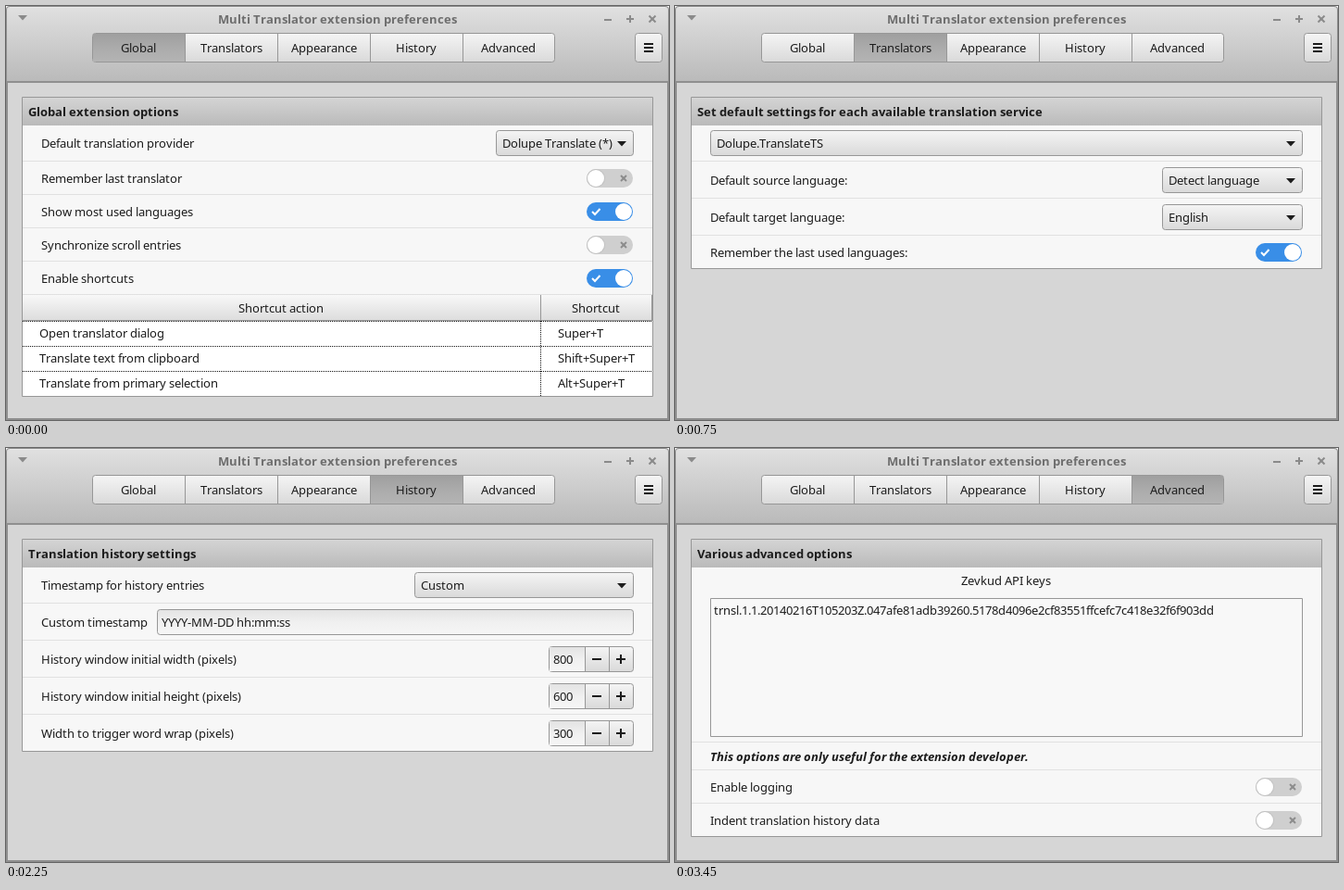
An HTML page with a canvas that plays this animation: 716x447 px, repeating every 3750 ms.

```html
<!DOCTYPE html>
<html lang="en">
<head>
<meta charset="utf-8">
<title>Extension preferences</title>
<style>
html, body { margin: 0; width: 100%; height: 100%; overflow: hidden; background: #d6d6d6; }
canvas { display: block; }
</style>
</head>
<body>
<canvas id="stage" width="716" height="447"></canvas>
<script>
const ctx = document.getElementById('stage').getContext('2d');
const PAGE_MS = 750;
const FAMILY = '"Noto Sans", sans-serif';
const INK = '#1c1c1c', EDGE = '#979797', BLUE = '#398ee7';
const advances = new Map();

function fill(color, x, y, w, h) {
  ctx.fillStyle = color;
  ctx.fillRect(x, y, w, h);
}

function shade(y, h, ...colors) {
  const g = ctx.createLinearGradient(0, y, 0, y + h);
  colors.forEach((c, i) => g.addColorStop(i / (colors.length - 1), c));
  return g;
}

// Glyphs advance by whole pixels, as in a hinted desktop toolkit.
function advance(ch, style) {
  const key = style + ch;
  if (!advances.has(key)) advances.set(key, Math.round(ctx.measureText(ch).width));
  return advances.get(key);
}

function text(str, x, middle, color = INK, style = '') {
  ctx.font = `${style} 13px ${FAMILY}`;
  ctx.fillStyle = color;
  for (const ch of str) {
    ctx.fillText(ch, x, middle + 5);
    x += advance(ch, style);
  }
}

function box(x, y, w, h, paint, edge = EDGE, radius = 3) {
  ctx.beginPath();
  ctx.roundRect(x + 0.5, y + 0.5, w - 1, h - 1, radius);
  ctx.fillStyle = paint;
  ctx.fill();
  ctx.strokeStyle = edge;
  ctx.lineWidth = 1;
  ctx.stroke();
}

function path(points, color, width) {
  ctx.beginPath();
  points.forEach(([x, y]) => ctx.lineTo(x, y));
  if (width) {
    ctx.strokeStyle = color;
    ctx.lineWidth = width;
    ctx.stroke();
  } else {
    ctx.fillStyle = color;
    ctx.fill();
  }
}

function cross(x, y, r, color) {
  path([[x - r, y - r], [x + r, y + r]], color, 2);
  path([[x + r, y - r], [x - r, y + r]], color, 2);
}

function plus(x, y, r, color) {
  fill(color, x - r, y - 1, 2 * r, 2);
  fill(color, x - 1, y - r, 2, 2 * r);
}

function button(x, y, w, h) {
  box(x, y, w, h, shade(y, h, '#f5f5f5', '#d9d9d9'));
}

function combo(x, middle, label) {
  button(x, middle - 14, 678 - x, 28);
  text(label, x + 7, middle);
  path([[660, middle - 2], [670, middle - 2], [665, middle + 3.5]], INK);
}

function entry(x, middle, right, label = '') {
  box(x, middle - 14, right - x, 28, shade(middle - 14, 28, '#e3e3e3', '#f0f0f0', '#f6f6f6'));
  text(label, x + 5, middle);
}

function spin(middle, value) {
  button(586, middle - 14, 92, 28);
  fill(shade(middle - 13, 26, '#e3e3e3', '#f0f0f0', '#f6f6f6'), 587, middle - 13, 38, 26);
  fill(EDGE, 625, middle - 13, 1, 26);
  fill(EDGE, 651, middle - 13, 1, 26);
  text(value, 591, middle);
  fill(INK, 633, middle - 1, 10, 2);
  plus(664, middle, 5, INK);
}

function disc(x, y, r, color) {
  ctx.beginPath();
  ctx.arc(x, y, r, 0, Math.PI * 2);
  ctx.fillStyle = color;
  ctx.fill();
}

function toggle(middle, on) {
  ctx.beginPath();
  ctx.roundRect(627, middle - 10, 50, 20, 10);
  ctx.fillStyle = on ? BLUE : '#cfcfcf';
  ctx.fill();
  if (on) {
    disc(667, middle, 9, '#fff');
    path([[633, middle], [636, middle + 3], [641.5, middle - 3]], '#fff', 2);
  } else {
    disc(637, middle, 10, '#c2c2c2');
    disc(637, middle, 9, '#fff');
    cross(667, middle, 3, '#8c8c8c');
  }
}

function folder(x, y) {
  fill('#444', x, y + 1, 12, 10);
  fill('#444', x + 1, y, 5, 1);
  fill('#e8e8e8', x + 1, y + 3, 4, 1);
  fill('#2a2a2a', x + 5, y + 3, 9, 10);
  fill('#e8e8e8', x + 6, y + 5, 6, 7);
}

function dots(x, y, length, vertical) {
  ctx.fillStyle = '#111';
  for (let i = 0; i < length; i += 2) {
    ctx.fillRect(vertical ? x : x + i, vertical ? y + i : y, 1, 1);
  }
}

function panel(title, bottom, separators) {
  box(17, 98, 682, bottom - 97, '#f7f7f7', EDGE, 0);
  fill(shade(99, 30, '#d4d4d4', '#bababa'), 18, 99, 680, 30);
  text(title, 24, 114, INK, 'bold');
  separators.forEach(y => fill('#e1e1e1', 18, y, 680, 1));
}

function labels(rows) {
  rows.forEach(([label, middle]) => text(label, 38, middle));
}

function globalPage() {
  panel('Global extension options', 421, [167, 203, 239, 275, 311]);
  labels([['Default translation provider', 148], ['Remember last translator', 186],
    ['Show most used languages', 222], ['Synchronize scroll entries', 258], ['Enable shortcuts', 294]]);
  combo(529, 148, 'Dolupe Translate (*)');
  [false, true, false, true].forEach((on, i) => toggle(186 + 36 * i, on));

  fill(shade(312, 28, '#f8f8f8', '#dcdcdc'), 18, 312, 680, 28);
  fill(EDGE, 18, 339, 680, 1);
  fill(EDGE, 577, 312, 1, 28);
  fill(EDGE, 697, 312, 1, 28);
  fill('#fff', 18, 340, 680, 81);
  text('Shortcut action', 251, 326);
  text('Shortcut', 611, 326);
  [['Open translator dialog', 'Super+T'], ['Translate text from clipboard', 'Shift+Super+T'],
    ['Translate from primary selection', 'Alt+Super+T']].forEach(([action, keys], i) => {
    dots(18, 340 + 27 * i, 680);
    text(action, 36, 353 + 27 * i);
    text(keys, 596, 353 + 27 * i);
  });
  dots(577, 340, 81, true);
}

function translatorsPage() {
  panel('Set default settings for each available translation service', 283, [167, 207, 247]);
  labels([['Default source language:', 188], ['Default target language:', 228],
    ['Remember the last used languages:', 266]]);
  combo(38, 148, 'Dolupe.TranslateTS');
  combo(526, 188, 'Detect language');
  combo(526, 228, 'English');
  toggle(266, true);
}

function appearancePage() {
  panel('Translation dialog appearance', 327, [167, 207, 247, 287]);
  labels([['Dialog theme', 148], ['Custom theme', 188], ['Font size (pixels)', 228],
    ['Percentage of screen width (pixels)', 268], ['Percentage of screen height (pixels)', 308]]);
  combo(522, 148, 'Mint-X-Greybird-Blue');
  entry(137, 188, 630);
  button(640, 174, 38, 28);
  folder(649, 182);
  ['15', '80', '60'].forEach((value, i) => spin(228 + 40 * i, value));
}

function historyPage() {
  panel('Translation history settings', 327, [167, 207, 247, 287]);
  labels([['Timestamp for history entries', 148], ['Custom timestamp', 188],
    ['History window initial width (pixels)', 228], ['History window initial height (pixels)', 268],
    ['Width to trigger word wrap (pixels)', 308]]);
  combo(441, 148, 'Custom');
  entry(163, 188, 678, 'YYYY-MM-DD hh:mm:ss');
  ['800', '600', '300'].forEach((value, i) => spin(228 + 40 * i, value));
}

function advancedPage() {
  panel('Various advanced options', 419, [317, 347, 383]);
  text('Zevkud API keys', 309, 143);
  box(38, 162, 640, 150, '#f8f8f8', EDGE, 0);
  text('trnsl.1.1.20140216T105203Z.047afe81adb39260.5178d4096e2cf83551ffcefc7c418e32f6f903dd', 42, 175);
  text('This options are only useful for the extension developer.', 38, 333, INK, 'italic bold');
  labels([['Enable logging', 366], ['Indent translation history data', 402]]);
  toggle(366, false);
  toggle(402, false);
}

const tabs = [
  { name: 'Global', x: 124, draw: globalPage },
  { name: 'Translators', x: 210, draw: translatorsPage },
  { name: 'Appearance', x: 308, draw: appearancePage },
  { name: 'History', x: 421, draw: historyPage },
  { name: 'Advanced', x: 513, draw: advancedPage }
];

function windowFrame() {
  const dim = '#8a8a8a';
  fill('#fff', 0, 0, 716, 447);
  ctx.beginPath();
  ctx.roundRect(0, 0, 716, 447, [4, 4, 0, 0]);
  ctx.fillStyle = '#8f8f8f';
  ctx.fill();
  fill('#d6d6d6', 2, 83, 712, 362);
  ctx.beginPath();
  ctx.roundRect(1, 1, 714, 80, [3, 3, 0, 0]);
  ctx.fillStyle = shade(1, 80, '#e0e0e0', '#bababa');
  ctx.fill();
  fill('#ececec', 4, 1, 708, 1);

  text('Multi Translator extension preferences', 229, 14, '#6e6e6e', 'bold');
  path([[13, 10], [23, 10], [18, 15.5]], dim);
  fill(dim, 646, 14, 8, 2);
  plus(674, 14, 4, dim);
  cross(698, 14, 3.5, dim);

  button(679, 29, 30, 32);
  [40, 44, 48].forEach(y => fill(INK, 689, y, 10, 2));
}

function tabBar(active) {
  button(93, 29, 500, 32);
  fill(shade(30, 30, '#9f9f9f', '#ababab', '#b4b4b4'), 94 + 100 * active, 30, active === 4 ? 98 : 99, 30);
  tabs.forEach((tab, i) => {
    if (i) fill(EDGE, 93 + 100 * i, 30, 1, 30);
    text(tab.name, tab.x, 45);
  });
}

function render(now) {
  const active = Math.floor((now - start) / PAGE_MS) % tabs.length;
  windowFrame();
  tabBar(active);
  tabs[active].draw();
}

function tick() {
  render(performance.now());
  requestAnimationFrame(tick);
}

const start = performance.now();
tick();
</script>
</body>
</html>
```
